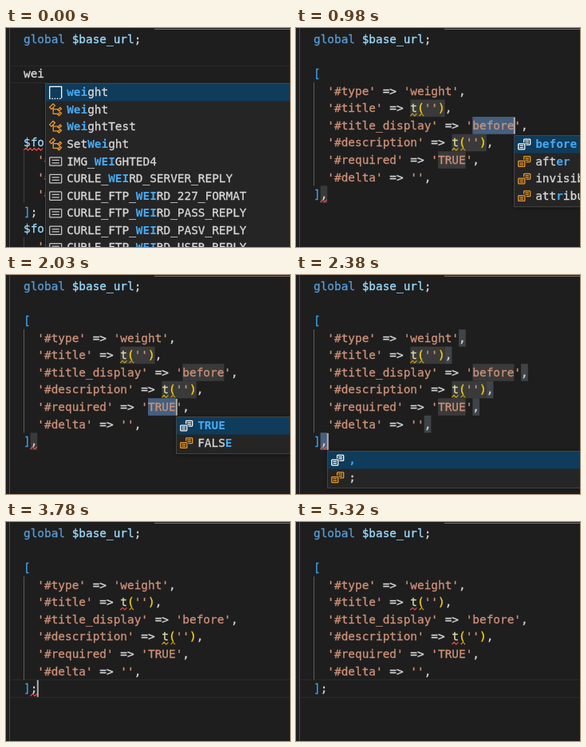
Animation, 356 px wide and 274 px high, one loop 5.81 s. Source, as an HTML page:

```html
<!DOCTYPE html>
<html lang="en">
<head>
<meta charset="utf-8">
<title>Snippet completion in a code editor</title>
<style>
  html, body { margin: 0; width: 100%; height: 100%; overflow: hidden; background: #1e1e1e; }
  svg { display: block; width: 356px; height: 274px; }
  text { font: 14.4px "DejaVu Sans Mono", monospace; white-space: pre; color: #d8d8d8; }
  text, tspan { fill: currentColor; stroke: currentColor; stroke-width: .3px; }
  .hit { font-weight: bold; color: #45abf5; stroke-width: 0; }
  .popup { filter: drop-shadow(0 1px 2px rgba(0, 0, 0, .4)); }
  .icon { fill: none; stroke-width: 1.1; }
</style>
</head>
<body>
<svg viewBox="0 0 356 274">
  <g id="back"></g>
  <g id="code"></g>
  <g id="front"></g>
</svg>
<script>
const LOOP = 5810, LEFT = 22, TOP = 3.4, CHAR = 8.669, LINE = 21.55, BASE = 15.75;
const ORANGE = '#ee9d28', YELLOW = '#cca700', RED = '#f14c4c';
const STOP = '#3a3a3a', MATCH = '#3f4449', BOTH = '#4c5157', PICKED = '#45607f';
const [back, code, front] = ['back', 'code', 'front'].map(id => document.getElementById(id));
const timed = [];

const colX = col => LEFT + col * CHAR;
const rowY = row => TOP + row * LINE;

function make(parent, tag, attrs = {}, content) {
  const el = document.createElementNS('http://www.w3.org/2000/svg', tag);
  for (const key in attrs) el.setAttribute(key, attrs[key]);
  if (content !== undefined) el.textContent = content;
  return parent.appendChild(el);
}

const rect = (parent, x, y, width, height, fill) =>
  make(parent, 'rect', { x, y, width, height, fill });

// A group shown only from start to end (ms)
function during(parent, start, end) {
  const el = make(parent, 'g');
  timed.push({ el, start, end });
  return el;
}

function colorOf(token) {
  if (token[0] === "'") return '#ce9178';
  if (token[0] === '$') return '#9cdcfe';
  if (token === 'global') return '#569cd6';
  if (token === 't') return '#dcdcaa';
  if (token === '(' || token === ')') return '#ffd700';
  if (token === '[' || token === ']') return '#3aa0e8';
  return '#d8d8d8';
}

function codeLine(parent, row, source) {
  const line = make(parent, 'text', { x: LEFT, y: rowY(row) + BASE });
  for (const token of source.match(/'[^']*'?|\$\w+|global|t(?=\()|[^'$]/g))
    make(line, 'tspan', { style: `color:${colorOf(token)}` }, token);
}

const mark = (parent, row, col, count, fill) =>
  rect(parent, colX(col), rowY(row), count * CHAR, LINE, fill);

const caret = (start, end, row, col) =>
  rect(during(front, start, end), Math.round(colX(col)) - .2, rowY(row) + .6, 2, LINE - .6, '#aeafad');

function squiggle(parent, row, col, count, stroke) {
  const step = 2.7, x = colX(col), y = rowY(row) + 20.4;
  let d = '';
  for (let i = 0; i * step <= count * CHAR; i++)
    d += `${i ? 'L' : 'M'}${x + i * step} ${y - (i % 2) * 2.8}`;
  make(parent, 'path', { d, stroke, fill: 'none', 'stroke-width': 1.1 });
}

const icons = {
  snippet: 'M1.5 14V1.5H14.5V14',
  type: 'M1.4 5.3L5.3 1.4L7.3 3.4L3.4 7.3Z M5.4 5.5V12.3H10.5 M5.4 7.3H10.5 ' +
    'M10.4 8L13 5.4L14.3 6.7L11.7 9.3Z M10.4 13L13 10.4L14.3 11.7L11.7 14.3Z',
  constant: 'M2 3.5H14L14.5 4V12L14 12.5H2L1.5 12V4Z M4 6.5H12 M4 9.5H12',
  choice: 'M7.5 6V3L8 2.5H14L14.5 3V8L14 8.5H10 M9 4.5H13 M9 6.5H13 ' +
    'M2 7.5H8L8.5 8V13L8 13.5H2L1.5 13V8Z M3 9.5H7 M3 11.5H7'
};

function icon(parent, kind, x, y, stroke) {
  const g = make(parent, 'g', { class: 'icon', transform: `translate(${x} ${y}) scale(1.15)`, stroke });
  make(g, 'path', { d: icons[kind] });
  if (kind === 'snippet')
    make(g, 'path', { d: 'M1 14.5H15', 'stroke-dasharray': '1.4 1.4' });
}

// Opens below a code row; rows are [icon, label] with matched letters between asterisks
function popup(start, end, x, row, rows, active = 0) {
  const y = rowY(row + 1) + 1;
  const g = make(during(front, start, end), 'g', { class: 'popup' });
  const box = rect(g, x + .5, Math.round(y) + .5, 400, rows.length * LINE + 3, '#252526');
  box.setAttribute('stroke', '#454545');
  rows.forEach(([kind, label], i) => {
    const top = y + 1 + i * LINE, on = i === active;
    if (on) rect(g, x + 1, Math.round(top), 400, LINE, '#0f3c5a');
    const own = kind === 'type' || kind === 'choice' ? ORANGE : '#c5c5c5';
    icon(g, kind, x + 4, top + 1.6, on ? '#ffffff' : own);
    const text = make(g, 'text', { x: x + 27.2, y: top + BASE - .5 });
    label.split('*').forEach((part, j) =>
      make(text, 'tspan', j % 2 ? { class: 'hit' } : {}, part));
  });
}

const currentLine = (start, end, row) => {
  const g = during(back, start, end);
  for (const r of [row, row + 1]) rect(g, 5, Math.round(rowY(r)), 351, 1, '#2a2a2a');
};

// Frame of the editor
rect(back, 4, 0, 1, 274, '#4a4a4a');
rect(back, 186, 1, 170, 1, '#757575');
codeLine(code, 0, 'global $base_url;');

// Typing the prefix
const before = during(code, 0, 210);
[[2, 'wei'], [6, '$fo'], [7, "  '#"], [8, "  '#"], [9, "  '#"], [10, '];'], [11, '$fo'], [12, "  '#"]]
  .forEach(([row, source]) => codeLine(before, row, source));
squiggle(before, 6, 0, 3, RED);
rect(before, LEFT, rowY(7), 1, 3 * LINE, '#404040');
rect(before, LEFT, rowY(12), 1, LINE, '#404040');
currentLine(0, 210, 2);
popup(0, 210, 49, 2, [
  ['snippet', '*wei*ght'], ['type', '*Wei*ght'], ['type', '*Wei*ghtTest'], ['type', 'Set*Wei*ght'],
  ['constant', 'IMG_*WEI*GHTED4'], ['constant', 'CURLE_*WEI*RD_SERVER_REPLY'],
  ...['227_FORMAT', 'PASS_REPLY', 'PASV_REPLY', 'USER_REPLY'].map(s => ['constant', `CURLE_FTP_*WEI*RD_${s}`])
]);

// Inserted snippet
const body = during(code, 210, LOOP);
['[', "  '#type' => 'weight',", "  '#title' => t(''),", "  '#title_display' => 'before',",
  "  '#description' => t(''),", "  '#required' => 'TRUE',", "  '#delta' => '',"]
  .forEach((source, i) => codeLine(body, i + 2, source));
rect(body, LEFT, rowY(3), 1, 6 * LINE, '#5c5c5c');
codeLine(during(code, 210, 3780), 9, '],');
codeLine(during(code, 3780, LOOP), 9, '];');

// Tab stops: row, column, length
const stops = { title: [4, 14, 5], display: [5, 23, 6], about: [6, 20, 5], required: [7, 18, 4], end: [9, 1, 1] };
const stopMarks = during(back, 210, 3780);
for (const stop of Object.values(stops)) mark(stopMarks, ...stop, STOP);

function pick(start, end, name) {
  mark(during(back, start, end), ...stops[name], PICKED);
}
pick(210, 980, 'title');
pick(980, 1400, 'display');
pick(1400, 1960, 'about');
pick(1960, 2380, 'required');
pick(2380, 3780, 'end');
mark(during(back, 280, 980), ...stops.about, BOTH);
mark(during(back, 1470, 1960), ...stops.title, BOTH);
const commas = during(back, 2380, 3780);
[21, 19, 30, 25, 23, 16].forEach((col, i) => mark(commas, i + 3, col, 1, MATCH));

// Diagnostics
function warn(start, end, row, col, color) {
  const g = during(code, start, end);
  squiggle(g, row, col, 1, color);
  squiggle(g, row, col + 1.3, .8, YELLOW);
}
warn(280, 3780, 4, 14, YELLOW);
warn(3780, LOOP, 4, 14, RED);
warn(280, 4550, 6, 20, YELLOW);
warn(4550, LOOP, 6, 20, RED);
squiggle(during(code, 280, 4550), 9, 1, 1, RED);

// Choices
popup(980, 1400, 273, 5, [
  ['choice', '*before*'], ['choice', 'aft*er*'], ['choice', 'invisible'], ['choice', 'att*r*ibute']
]);
popup(2030, 2380, 213, 7, [['choice', '*TRUE*'], ['choice', 'FALS*E*']]);
const ends = [['choice', '*,*'], ['choice', ';']];
popup(2380, 3220, 39, 9, ends, 0);
popup(3220, 3780, 39, 9, ends, 1);
currentLine(3780, LOOP, 9);

caret(210, 700, 4, 19);
caret(980, 1400, 5, 29);
caret(1400, 1960, 6, 25);
caret(1960, 2380, 7, 22);
[[2380, 2870], [3430, 4270], [4760, 5320]].forEach(([start, end]) => caret(start, end, 9, 2));

function draw(now) {
  const t = now % LOOP;
  for (const { el, start, end } of timed)
    el.style.display = t >= start && t < end ? '' : 'none';
}
const origin = performance.now();
function tick() {
  draw(performance.now() - origin);
  requestAnimationFrame(tick);
}
tick();
</script>
</body>
</html>
```
